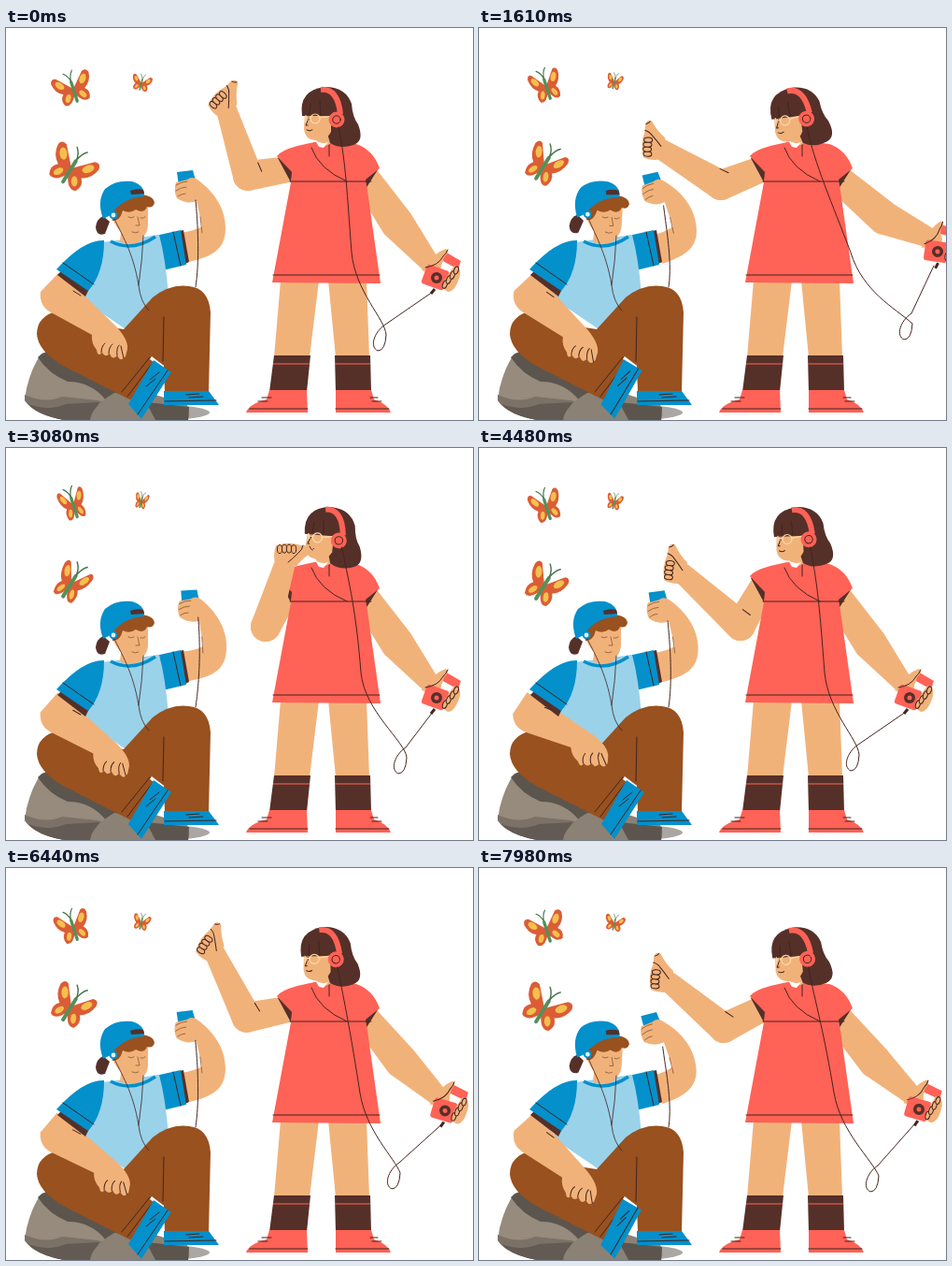
Animation, 500 px wide and 419 px high, one loop 8 s. Source, as an HTML page:

```html
<!DOCTYPE html>
<html lang="en">
<head>
<meta charset="utf-8">
<title>Listening to music</title>
<style>
  html, body { margin: 0; width: 100%; height: 100%; overflow: hidden; background: #fff; }
  svg { display: block; width: 100%; height: 100%; }
  .skin { fill: #f1b27a; }
  .coral { fill: #ff6256; }
  .dark { fill: #553029; }
  .blue { fill: #0490cb; }
  .sky { fill: #9ad2ea; }
  .pants { fill: #98511f; }
  .line { fill: none; stroke: #43241f; stroke-width: 1; stroke-linecap: round; stroke-linejoin: round; }
  .faint { stroke-width: .7; stroke: #7a4a2c; }
  .finger { fill: #f1b27a; stroke: #43241f; stroke-width: 1; }
</style>
</head>
<body>
<svg viewBox="0 0 500 419">
  <defs>
    <g id="wing">
      <path fill="#db5d36" d="M0 0L16-17Q22-19 23-13Q22-2 13 3Q19 8 15 16Q7 20 0 6Z"/>
      <ellipse cx="14" cy="-8" rx="3.6" ry="6" transform="rotate(38 14 -8)" fill="#f3c04e"/>
      <ellipse cx="9" cy="9" rx="3" ry="5" transform="rotate(-32 9 9)" fill="#f3c04e"/>
    </g>
    <g id="body" fill="none" stroke="#55905a" stroke-linecap="round">
      <path stroke-width="3.6" d="M0-8L0 15"/>
      <path stroke="#48764c" stroke-width="1.3" d="M0-9Q-1-16-6-20M0-9Q1-17 5-21"/>
    </g>
  </defs>

  <g id="rock">
    <ellipse cx="165" cy="411" rx="53" ry="8" fill="#aaa6a3"/>
    <path fill="#968b7c" d="M20 398L22 385Q28 361 38 348Q46 344 57 346L120 372L150 400L100 419H62Q30 413 20 398Z"/>
    <path fill="#5c554e" d="M34 352Q42 343 60 347L110 372L128 402L108 399Q92 378 66 378Q46 370 34 352Z"/>
    <path fill="#7b7167" d="M20 392Q42 402 60 394L98 398L112 402L92 419H62Q30 413 20 398Z"/>
    <path fill="#625a53" d="M24 402Q45 410 64 402L100 400L90 419H62Q34 414 24 402Z"/>
    <path fill="#8b8275" d="M90 419Q92 404 116 390L160 392L194 403Q198 411 195 419Z"/>
    <path fill="#5c554e" d="M150 400L170 402L196 405L195 419H160Z"/>
  </g>

  <g id="butterflies"></g>

  <g id="boy">
    <g id="phoneArm">
      <path class="blue" d="M183 154L200 152L203 163L185 169Z"/>
      <path class="skin" d="M186 219Q202 217 210 212L204 185Q194 189 183 182Q179 174 182 165L194 162Q199 158 205 162C224 176 235 194 235 214C235 236 222 244 196 250L180 246Z"/>
      <path class="line faint" d="M182 168Q188 164 194 164M182 174Q188 170 193 170M184 180Q188 177 192 177M208 202L210 219"/>
    </g>
    <path id="boyCord" class="line" stroke-dasharray="3 .6"/>
    <path class="dark" d="M186 217L190 216L196 250L190 253Z"/>
    <path class="blue" d="M160 222L187 216L193 253L168 259Z"/>
    <path class="line" d="M179 218L187 254"/>
    <path class="sky" d="M103 229L164 221Q171 247 174 286L140 330L78 288Q99 258 103 229Z"/>
    <path class="skin" d="M124 210L147 212L147 224Q138 236 122 228Z"/>
    <path fill="none" stroke="#0490cb" stroke-width="3.5" d="M112 228Q135 240 160 223"/>
    <path class="pants" d="M56 302Q33 308 33 327Q34 345 61 361L138 400L162 357L169 361L170 389H217L219 304Q217 278 196 276Q176 273 157 288L126 322L100 318Z"/>
    <path class="line" d="M169 309L168 356M159 355L130 394M154 352L124 389"/>
    <path fill="#fff" d="M156 351L169 361L168 365L154 354Z"/>
    <path class="blue" d="M169 388H217L228 403H169Z"/>
    <path class="line" d="M170 399L225 398M193 392L207 391M196 395L211 394"/>
    <g id="shoe">
      <path class="blue" d="M158 355L177 368L145 418L131 402Z"/>
      <path class="line" d="M173 366L141 413M154 376L164 368M150 383L160 375"/>
    </g>
    <g id="restArm">
      <path class="skin" d="M56 262L37 282Q35 298 50 305L92 328Q91 337 97 344Q98 352 103 347Q106 353 111 348Q114 356 119 350Q123 358 128 351L130 343Q131 333 118 319L80 282Z"/>
      <path class="line" d="M72 281L80 286M102 347Q102 340 106 337M110 348Q110 341 114 338M119 350Q118 342 121 339M126 353L123 340"/>
    </g>
    <path class="dark" d="M59 260L89 279L85 287L55 264Z"/>
    <path class="blue" d="M105 227Q83 226 54 258L88 281Q105 262 105 227Z"/>
    <path class="line" d="M61 251L94 274"/>
    <g id="boyHead">
      <path class="skin" d="M112 196L152 187L152 211Q151 225 138 226Q122 222 115 206Z"/>
      <path class="dark" d="M104 201L111 207L106 220Q97 223 96 213Q97 204 104 201Z"/>
      <path class="pants" d="M112 191L140 178Q158 178 159 187Q157 193 151 191Q148 199 139 194Q132 199 125 195Q122 207 114 206Z"/>
      <path class="blue" d="M104 204Q97 185 106 172Q117 162 135 164Q149 168 148 180Q125 181 112 200Z"/>
      <path class="dark" d="M133 174Q140 171 147 173L148 177L134 178Z"/>
      <path class="line faint" d="M131 202Q134 204 137 202M144 203Q147 204 149 202M141 202L143 211H139M135 218Q139 220 142 218"/>
      <circle cx="115" cy="200" r="3.4" fill="#dff1f8" stroke="#0490cb" stroke-width="2"/>
    </g>
    <path id="earCords" class="line" stroke-opacity=".8"/>
  </g>

  <g id="girl">
    <path class="skin" d="M294 270H335L325 352H287ZM345 270H386L389 352H353Z"/>
    <path class="dark" d="M287 350H326L322 389H282ZM352 350H390L391 389H353Z"/>
    <path d="M286 359H325M352 359H390" stroke="#ff6256"/>
    <path class="coral" d="M282 387H322L323 411H257Q260 402 279 397ZM353 387H391L394 397Q409 402 412 411H353Z"/>
    <path class="line" d="M261 407H323M353 407H410M270 399L280 399M274 395L284 395M390 395L398 395M392 399L402 399"/>
    <path id="farArm" class="skin"/>
    <path id="upperArm" class="skin"/>
    <path class="dark" d="M291 139L300 135L308 150L305 165ZM399 150L384 151L385 172Z"/>
    <path class="coral" d="M330 122L312 126Q294 131 290 137L306 154L305 165L285 272L401 273L387 174L385 162L400 150Q393 130 375 124L350 121Z"/>
    <path class="line" d="M304 164H391M286 264H400M327 128Q335 151 365 164M346 122V137"/>
    <path class="skin" d="M331 108H348V123Q340 130 332 120Z"/>
    <path fill="#fff" d="M331 120Q338 125 345 122L340 128L335 127Z"/>
    <g id="girlHead">
      <path class="dark" d="M318 92Q315 66 344 63Q364 64 370 81Q371 95 377 103Q384 121 372 125Q358 130 347 123L338 92Z"/>
      <path class="skin" d="M320 90H348V111Q344 120 331 120Q320 119 319 108Z"/>
      <path class="dark" d="M317 94Q313 66 342 63L353 76L350 94Z"/>
      <path class="line" d="M326 81L325 92M336 78L337 93M324 95V98M322 109Q325 111 328 109M323 99L321 104H323"/>
      <g fill="none" stroke="#f8dba8" stroke-width="1.2">
        <circle cx="331" cy="97" r="5"/>
        <path d="M336 96L349 94M326 96L320 96M321 93V101"/>
      </g>
      <path fill="none" stroke="#ff6256" stroke-width="6" d="M337 66Q355 64 358 92"/>
      <circle class="coral" cx="354" cy="98" r="8.5"/>
      <circle class="line" cx="354" cy="98" r="4.2"/>
    </g>
    <path id="cable" class="line" stroke-width="1.2"/>
    <g id="player">
      <path class="coral" d="M9-28L26-18L23-9L5-19Z"/>
      <path class="skin" d="M-16-8Q-3-27 10-31Q15-28 8-22Q6-11-2-4Z"/>
      <rect class="coral" x="-14" y="-11" width="25" height="22" rx="3" transform="rotate(20)"/>
      <circle r="6" fill="#553029"/>
      <circle r="2.5" class="coral"/>
      <path class="skin" d="M8 3L19-13Q27-11 25-2Q20 15 12 15Q5 12 8 3Z"/>
      <g class="finger">
        <ellipse cx="9" cy="7" rx="2.3" ry="4.5" transform="rotate(20 9 7)"/>
        <ellipse cx="13" cy="2" rx="2.3" ry="4.5" transform="rotate(20 13 2)"/>
        <ellipse cx="17" cy="-3" rx="2.3" ry="4.5" transform="rotate(20 17 -3)"/>
        <ellipse cx="21" cy="-8" rx="2.3" ry="4" transform="rotate(20 21 -8)"/>
      </g>
      <path class="line" d="M-12-11Q2-13 7-23Q10-25 12-30"/>
      <path d="M-6 17L-2 12" stroke="#43241f" stroke-width="3"/>
    </g>
    <path id="forearm" class="skin"/>
    <path id="crease" class="line" d="M0 15.5L10 14.5"/>
    <g id="fist">
      <path class="skin" d="M-4-10Q8-14 18-10Q23 4 18 18L18 26Q16 31 11 29Q6 20-4 12Z"/>
      <g class="finger">
        <ellipse cx="14" cy="-6" rx="4.5" ry="2.6"/>
        <ellipse cx="14.5" cy="-1" rx="4.5" ry="2.6"/>
        <ellipse cx="14.5" cy="4" rx="4.5" ry="2.6"/>
        <ellipse cx="14" cy="9" rx="4.5" ry="2.6"/>
      </g>
      <path class="line" d="M18 19Q13 18 10 14Q5 9 0 3M17 26Q14 27 13 29"/>
    </g>
  </g>
</svg>
<script>
const LOOP = 8000, CYCLE = 5900;
const $ = id => document.getElementById(id);

// One dance cycle: each row lists a joint's value at the matching time.
const times = [0, 1170, 1610, 2080, 3080, 4480, 5530];
const poses = {
  elbowX:   [259, 257, 259, 262, 278, 280, 261],
  elbowY:   [158, 164, 168, 171, 191, 190, 167],
  armTurn:  [-108, -135, -149, -140, -73, -138, -114],
  armLen:   [74, 79, 75, 77, 72, 84, 73],
  wrist:    [-28, -33, -28, -35, -17, -35, -30],
  head:     [0, -5, -7, -5, 5, -2, 0],
  playerX:  [461, 486, 491, 471, 461, 461, 461],
  playerY:  [267, 245, 239, 258, 267, 267, 267],
  loopX:    [400, 444, 457, 421, 422, 400, 400],
  loopY:    [345, 338, 333, 346, 348, 345, 345],
  cableX:   [370, 394, 398, 380, 380, 370, 370],
  phone:    [0, -1, -6, -7, 3, -1, 0],
  boyHead:  [0, 0, 3, 3, 0, 0, 0],
  restArm:  [0, -7, 3, 4, -2, -10, 0],
  shoe:     [0, 0, -3, -4, 0, 0, 0]
};
// Wing beats completed at each moment of the loop.
const beats = [[0, 0], [1610, 2.29], [3080, 4.5], [4480, 6.72], [5530, 8.42], [7070, 10.73], [8000, 12.03]];

// Cyclic monotone cubic, so joints never overshoot their poses.
function sample(values, time) {
  const n = times.length;
  const at = i => times[(i + n) % n] + Math.floor(i / n) * CYCLE;
  const val = i => values[(i + n) % n];
  const slope = i => (val(i + 1) - val(i)) / (at(i + 1) - at(i));
  const tangent = i => {
    const a = slope(i - 1), b = slope(i);
    return a * b <= 0 ? 0 : 2 * a * b / (a + b);
  };
  const t = time % CYCLE;
  let i = n - 1;
  while (at(i) > t) i--;
  const h = at(i + 1) - at(i), u = (t - at(i)) / h, v = 1 - u;
  return val(i) * (1 + 2 * u) * v * v + tangent(i) * h * u * v * v
    + val(i + 1) * u * u * (3 - 2 * u) - tangent(i + 1) * h * u * u * v;
}

function wingBeat(t) {
  const i = beats.findIndex(b => b[0] > t);
  const [a, b] = [beats[i - 1], beats[i]];
  return a[1] + (b[1] - a[1]) * (t - a[0]) / (b[0] - a[0]);
}

// Tapered limb between two round joints.
function limb(x1, y1, r1, x2, y2, r2) {
  const a = Math.atan2(y2 - y1, x2 - x1), nx = -Math.sin(a), ny = Math.cos(a);
  return `M${x1 + nx * r1} ${y1 + ny * r1}L${x2 + nx * r2} ${y2 + ny * r2}`
    + `A${r2} ${r2} 0 0 0 ${x2 - nx * r2} ${y2 - ny * r2}L${x1 - nx * r1} ${y1 - ny * r1}`
    + `A${r1} ${r1} 0 0 0 ${x1 + nx * r1} ${y1 + ny * r1}Z`;
}

const draw = (id, d) => $(id).setAttribute('d', d);
const move = (id, transform) => $(id).setAttribute('transform', transform);
const turn = (id, angle, x, y) => move(id, `rotate(${angle} ${x} ${y})`);

const butterflies = [
  { x: 72, y: 65, size: .92, tilt: -18 },
  { x: 145, y: 59, size: .47, tilt: 14 },
  { x: 70, y: 150, size: 1.12, tilt: 32 }
];
$('butterflies').innerHTML = butterflies.map(() =>
  '<g><use href="#wing"/><use href="#wing"/><use href="#body"/></g>').join('');

function drawButterflies(t) {
  const open = (1 + Math.cos(2 * Math.PI * wingBeat(t))) / 2;
  const width = .68 + .32 * open;
  butterflies.forEach((b, i) => {
    const g = $('butterflies').children[i];
    const y = b.y - 5 * b.size * (1 - open);
    g.setAttribute('transform', `translate(${b.x} ${y}) rotate(${b.tilt}) scale(${b.size})`);
    g.children[0].setAttribute('transform', `scale(${width} 1)`);
    g.children[1].setAttribute('transform', `scale(${-width} 1)`);
  });
}

function drawBoy(p) {
  turn('phoneArm', p.phone, 212, 235);
  turn('boyHead', p.boyHead, 132, 225);
  turn('restArm', p.restArm, 50, 288);
  turn('shoe', p.shoe, 140, 412);
  const plug = 203 + p.phone * .9, ear = 116 + p.boyHead * .5;
  draw('boyCord', `M${plug} ${184 - p.phone}C${plug + 3} 215 207 250 203 277`);
  draw('earCords', `M${ear} 204C123 219 136 239 142 275Q144 293 153 302M147 222Q146 248 142 275`);
}

function drawGirl(p) {
  const a = p.armTurn * Math.PI / 180;
  const handX = p.elbowX + p.armLen * Math.cos(a), handY = p.elbowY + p.armLen * Math.sin(a);
  draw('upperArm', limb(302, 151, 14, p.elbowX, p.elbowY, 16));
  draw('forearm', limb(p.elbowX, p.elbowY, 16, handX, handY, 11));
  move('crease', `translate(${p.elbowX} ${p.elbowY}) rotate(${p.armTurn})`);
  move('fist', `translate(${handX} ${handY}) rotate(${p.armTurn + p.wrist})`);
  $('crease').style.opacity = p.armTurn < -95 ? 1 : 0;
  turn('girlHead', p.head, 345, 125);

  const { playerX: x, playerY: y, loopX, loopY } = p, out = x - 461;
  const bendX = 419 + out * .5, bendY = 209 - out * .2;
  draw('farArm', limb(387, 163, 15, bendX, bendY, 18) + limb(bendX, bendY, 18, x - 5, y - 13, 10));
  move('player', `translate(${x} ${y}) rotate(${-out * .4})`);
  const startX = 356 + p.head * .7, m = p.cableX;
  draw('cable', `M${startX} 106C${startX + 8} 145 ${m - 5 - out * .5} ${175 + out * .4} ${m} 240`
    + `C${m + 4 + out * .3} 282 ${loopX + 6 - out * .6} ${loopY - 34} ${loopX + 7} ${loopY - 17}`
    + `Q${loopX + 6} ${loopY} ${loopX - 2} ${loopY}`
    + `C${loopX - 11} ${loopY - 4} ${loopX - 6} ${loopY - 20} ${loopX + 6} ${loopY - 28}`
    + `L${x - 4} ${y + 15}`);
}

function render(t) {
  const p = {};
  for (const joint in poses) p[joint] = sample(poses[joint], t);
  drawButterflies(t);
  drawBoy(p);
  drawGirl(p);
}

const start = performance.now();
function tick() {
  const t = (performance.now() - start) % LOOP;
  render(Math.floor(t / 70) * 70);
  requestAnimationFrame(tick);
}
render(0);
requestAnimationFrame(tick);
</script>
</body>
</html>
```
